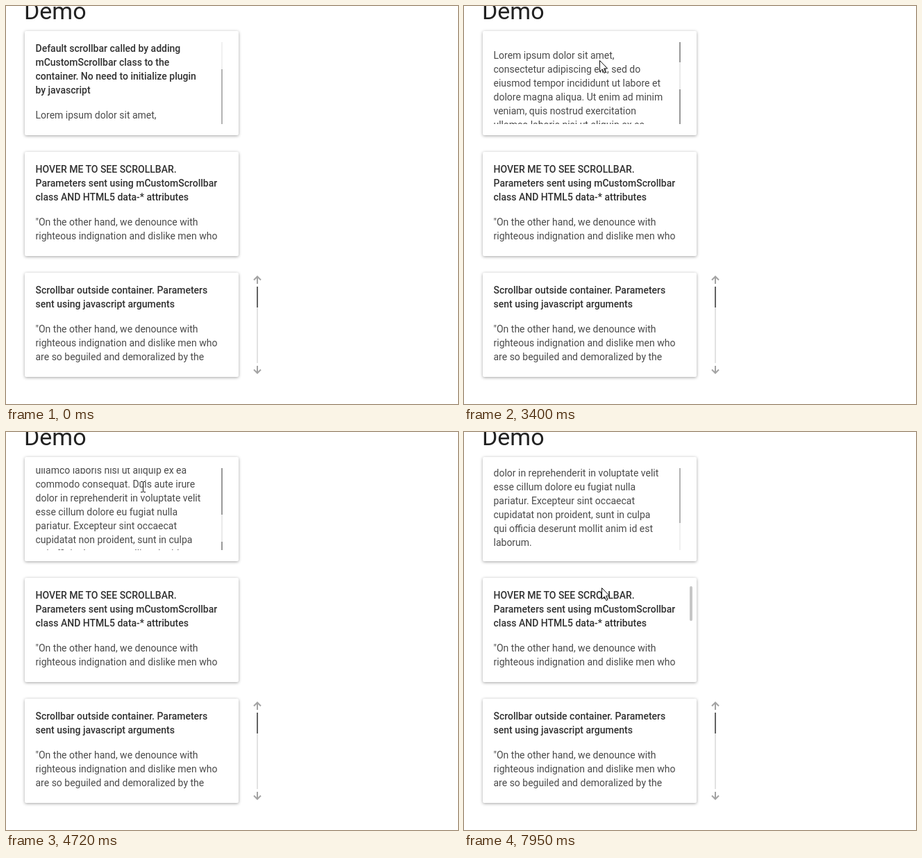
Recreate the animation shown at these times as an HTML page. Size 651 by 573 pixels, loop 8000 ms.

```html
<!DOCTYPE html>
<html lang="en">
<head>
<meta charset="utf-8">
<title>Scrollbar demo</title>
<style>
  html, body { margin: 0; width: 651px; height: 573px; overflow: hidden; background: #fff; }
  body { position: relative; font: 14px/20px Roboto, sans-serif; color: #4a4a4a; }
  h1, h2, p { margin: 0; font-size: 14px; white-space: pre; }
  h1 { position: absolute; left: 26px; top: -13px; font: 34px/40px Roboto, sans-serif; color: #212121; }
  h2 { font-weight: 500; color: #303030; margin-bottom: 16px; }
  .card { position: absolute; left: 27px; width: 308px; height: 150px; border-radius: 2px; background: #fff;
    box-shadow: 0 1px 4px rgba(0,0,0,.37); }
  .view { position: absolute; left: 15.5px; top: 16px; width: 266px; height: 118px; overflow: hidden; }
  .content { position: absolute; top: -1px; }
  .rail { position: absolute; left: 283px; top: 16px; width: 2px; height: 118px; background: rgba(0,0,0,.4); }
  .rail i { position: absolute; width: 2px; height: 39px; background: rgba(255,255,255,.8); }
  #hoverThumb { position: absolute; left: 298px; top: 12px; width: 4px; height: 50px; border-radius: 2px; background: #c6c6c6; }
  svg { position: absolute; left: 0; top: 0; }
</style>
</head>
<body>
<h1>Demo</h1>

<div class="card" style="top:36px">
  <div class="view"><div class="content" id="content"><h2>Default scrollbar called by adding
mCustomScrollbar class to the
container. No need to initialize plugin
by javascript</h2><p>Lorem ipsum dolor sit amet,
consectetur adipiscing elit, sed do
eiusmod tempor incididunt ut labore et
dolore magna aliqua. Ut enim ad minim
veniam, quis nostrud exercitation
ullamco laboris nisi ut aliquip ex ea
commodo consequat. Duis aute irure
dolor in reprehenderit in voluptate velit
esse cillum dolore eu fugiat nulla
pariatur. Excepteur sint occaecat
cupidatat non proident, sunt in culpa
qui officia deserunt mollit anim id est
laborum.</p></div></div>
  <div class="rail" id="rail"><i id="thumb"></i></div>
</div>

<div class="card" style="top:210px">
  <div class="view"><div class="content"><h2>HOVER ME TO SEE SCROLLBAR.
Parameters sent using mCustomScrollbar
class AND HTML5 data-* attributes</h2><p>"On the other hand, we denounce with
righteous indignation and dislike men who</p></div></div>
  <div id="hoverThumb"></div>
</div>

<div class="card" style="top:384px">
  <div class="view"><div class="content"><h2>Scrollbar outside container. Parameters
sent using javascript arguments</h2><p>"On the other hand, we denounce with
righteous indignation and dislike men who
are so beguiled and demoralized by the</p></div></div>
</div>

<svg width="651" height="573" fill="none">
  <path d="M361 404h2v110h-2z" fill="#e2e2e2"/>
  <path d="M361 404h2v30h-2z" fill="#636363"/>
  <path d="M362 400v-10.5M357 394.5l5-5 5 5M362 518v10.5M357 523.5l5 5 5-5" stroke="#a3a3a3" stroke-width="2"/>
  <g id="cursor">
    <path id="arrow" d="M.5 .5V16.5L4.3 13 6.8 18.5 9 17.5 6.6 12H11.6Z" fill="#fff" stroke="#111"/>
    <path id="beam" d="M-1 -6.5h3m1 0h3M2.5 -6v14M-1 8.5h3m1 0h3" stroke="#111"/>
  </g>
</svg>

<script>
const LOOP = 8000, STEP = 220 / 3;
const MAX_SCROLL = 238, THUMB_TRAVEL = 79;
const $ = id => document.getElementById(id);
const clamp = v => Math.min(1, Math.max(0, v));
const snap = (t, phase) => Math.floor((t - phase + 1) / STEP) * STEP + phase;
const easeOut = (t, start, duration, power) => 1 - (1 - clamp((t - start) / duration)) ** power;

// time, x, y of the pointer
const path = [
  [360, 638, 539], [600, 440, 300], [850, 245, 130], [1000, 190, 75], [1100, 165, 83],
  [1173, 162, 83], [1246, 159, 83], [2570, 159, 83], [2640, 180, 80], [2786, 195, 78],
  [6600, 195, 78], [6893, 197, 172], [7187, 197, 216], [7260, 197, 216], [7333, 197, 220],
  [7406, 197, 223], [7900, 197, 223], [7920, 198, 224]
];

function pointerAt(t) {
  const next = path.findIndex(key => key[0] > t);
  if (next < 1) return (next ? path[path.length - 1] : path[0]).slice(1);
  const [a, b] = [path[next - 1], path[next]];
  const k = (t - a[0]) / (b[0] - a[0]);
  return [1, 2].map(i => Math.round(a[i] + (b[i] - a[i]) * k));
}

function scrollAt(t) {
  return Math.round(159 * easeOut(t, 3140, 920, 2.42)
    + 72 * easeOut(t, 4335, 960, 1.84)
    + 7 * easeOut(t, 6140, 700, 2.5));
}

function draw(now) {
  const t = now % LOOP;
  const scroll = scrollAt(snap(t, 20));
  $('content').style.top = -1 - scroll + 'px';
  $('thumb').style.top = Math.round(scroll * THUMB_TRAVEL / MAX_SCROLL) + 'px';
  $('rail').style.opacity = t < 7640 ? .75 + .25 * clamp((t - 880) / 200) : .75;
  $('hoverThumb').style.opacity = clamp((t - 6970) / 200);

  const [x, y] = pointerAt(snap(t, 0));
  const overGap = scroll > 50 && scroll < 100;
  const overText = x < 250 && y < 170 && !overGap;
  $('cursor').style.display = t < 360 ? 'none' : '';
  $('cursor').setAttribute('transform', `translate(${x} ${y})`);
  $('arrow').style.display = overText ? 'none' : '';
  $('beam').style.display = overText ? '' : 'none';
}

const start = performance.now();
(function tick() {
  draw(performance.now() - start);
  requestAnimationFrame(tick);
})();
</script>
</body>
</html>
```
